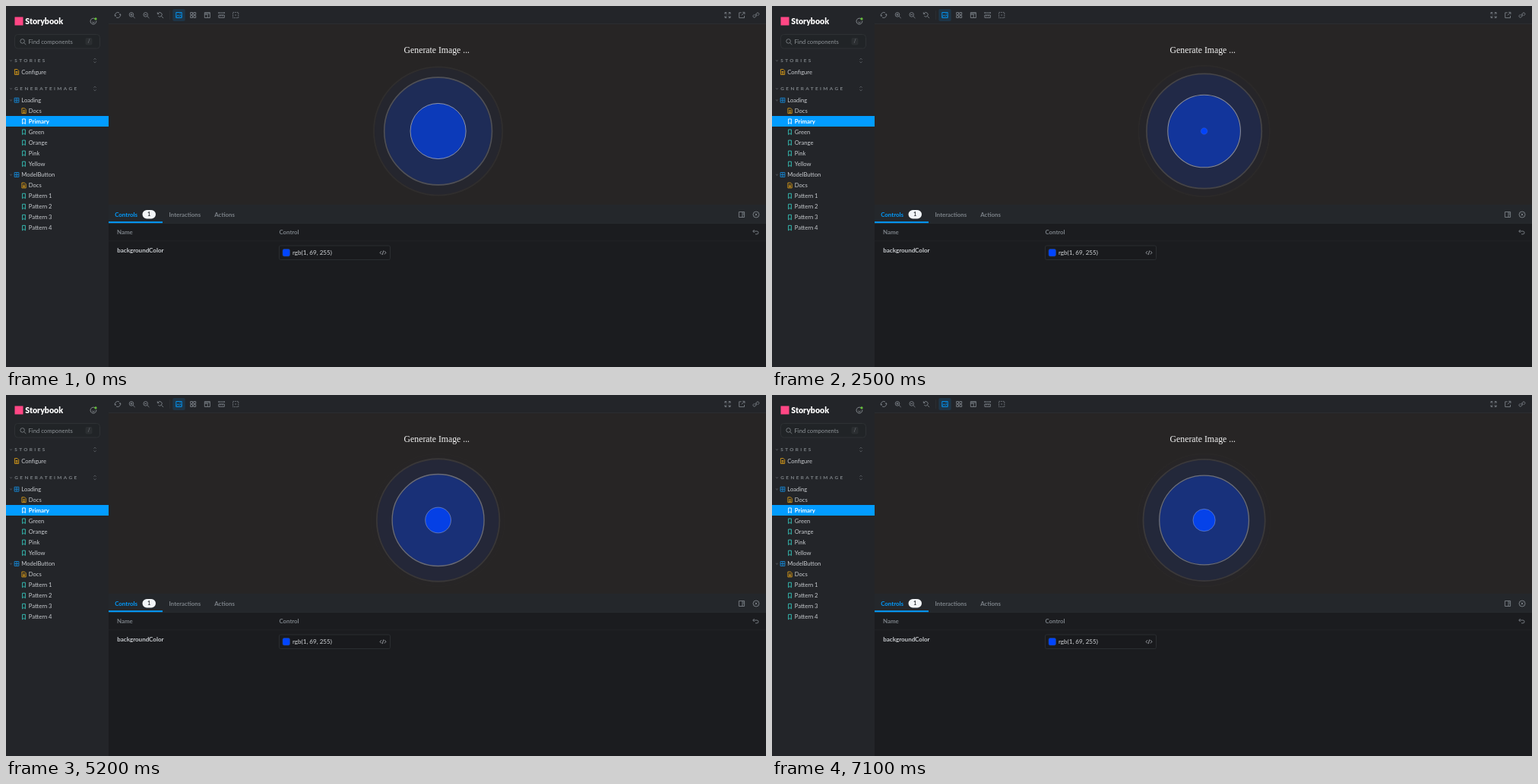
Recreate the animation shown at these times as an HTML page with a canvas. Size 1000 px wide and 476 px high, loop 7200 ms.

```html
<!DOCTYPE html>
<html lang="en">
<head>
<meta charset="utf-8">
<title>Generate Image loading</title>
<style>
  html, body { margin: 0; width: 100%; height: 100%; overflow: hidden; background: #1b1c1f; }
  canvas { display: block; width: 100vw; height: 100vh; }
</style>
</head>
<body>
<canvas id="stage" width="1000" height="476"></canvas>
<script>
const stage = document.getElementById('stage');
const c = stage.getContext('2d');
const SANS = 'Lato, "Open Sans", sans-serif';
const SERIF = '"Liberation Serif", "Times New Roman", serif';
const BLUE = '#029cff', GREY = '#7c8288', LIGHT = '#c9ccd0', BAR = '#232529', PANEL = '#1b1c1f';
const LEFT = 135, WIDTH = 865;
const LOOP = 7200, STEP = 100, PERIOD = 8000, LEAD = 25, RINGS = 4, RADIUS = 89;
const CENTER = { x: 568.6, y: 165 };

function rect(x, y, w, h, fill) {
  c.fillStyle = fill;
  c.fillRect(x, y, w, h);
}

function box(x, y, w, h, r, fill, stroke, width = 1) {
  c.beginPath();
  c.roundRect(x, y, w, h, r);
  if (fill) { c.fillStyle = fill; c.fill(); }
  if (stroke) { c.strokeStyle = stroke; c.lineWidth = width; c.stroke(); }
}

function text(str, x, y, size, color, weight = 400, spacing = 0, family = SANS) {
  c.font = `${weight} ${size}px ${family}`;
  c.letterSpacing = spacing + 'px';
  c.fillStyle = color;
  c.fillText(str, x, y);
}

// Strokes an SVG path whose coordinates are relative to (x, y).
function icon(x, y, d, color = GREY, width = 0.9) {
  c.save();
  c.translate(x, y);
  c.strokeStyle = color;
  c.lineWidth = width;
  c.stroke(new Path2D(d));
  c.restore();
}

const LENS = 'M2.1-.6A2.8 2.8 0 1 1-3.5-.6A2.8 2.8 0 1 1 2.1-.6M1.4 1.5L4 4';
const ICONS = {
  search: LENS,
  sync: 'M-3.3 1.4A3.6 3.6 0 0 1 2-3M3.3-1.4A3.6 3.6 0 0 1-2 3M-4.1-.2L-3.3 1.4L-1.9.5M4.1.2L3.3-1.4L1.9-.5',
  zoomIn: LENS + 'M-2.2-.6H.8M-.7-2.1V.9',
  zoomOut: LENS + 'M-2.2-.6H.8',
  zoomReset: 'M-3.2-2A2.8 2.8 0 1 1-2.8 1.2M-3.8-3.7V-1.5H-1.6M1.4 1.5L4 4',
  photo: 'M-3.7-3.5H3.7V3.5H-3.7ZM-3.5 2.3L-1.2 0L.6 1.6L2 .2L3.6 1.8M1-1.7H2.2',
  grid: 'M-3.5-3.5H-.7V-.7H-3.5ZM.7-3.5H3.5V-.7H.7ZM-3.5.7H-.7V3.5H-3.5ZM.7.7H3.5V3.5H.7Z',
  screens: 'M-3.6-3.4H3.5V3.5H.3M-3.6-3.4V-1M-3.6-1H.3V3.5H-3.6ZM-3-2H3.2',
  measure: 'M-3.7-3H3.7M-3.7-4V-2M3.7-4V-2M-3.7 0H3.7V3.4H-3.7ZM-1.5 0V1.6M1.2 0V1.6',
  expand: 'M-3.5-1.2V-3.5H-1.2M1.2-3.5H3.5V-1.2M3.5 1.2V3.5H1.2M-1.2 3.5H-3.5V1.2M-3.3-3.3L-1-1M3.3-3.3L1-1M3.3 3.3L1 1M-3.3 3.3L-1 1',
  external: 'M-.6-3.2H-3.5V3.6H3.3V.8M1-3.7H3.7V-1M3.5-3.5L-.3.3',
  link: 'M-.7 1.2A1.7 1.7 0 0 1-.5-1L1.1-2.7A1.7 1.7 0 0 1 3.5-.3L2.4.8M.7-1.2A1.7 1.7 0 0 1 .5 1L-1.1 2.7A1.7 1.7 0 0 1-3.5.3L-2.4-.8',
  side: 'M-3.6-3.5H3.6V3.5H-3.6ZM1-3.5V3.5M1.9-1.8H2.9M1.9 0H2.9',
  close: 'M4 0A4 4 0 1 1-4 0A4 4 0 1 1 4 0M-1.5-1.5L1.5 1.5M1.5-1.5L-1.5 1.5',
  undo: 'M-1.8-3L-3.8-1L-1.8 1M-3.6-1H1.6A1.9 1.9 0 0 1 1.6 2.8H-.5',
  code: 'M-2-2.1L-3.9 0L-2 2.1M2-2.1L3.9 0L2 2.1M.8-2.8L-.8 2.8',
  sort: 'M-1.6-1.3L0-2.9L1.6-1.3M-1.6 1.3L0 2.9L1.6 1.3',
  caret: 'M-1.2-.5L0 .6L1.2-.5',
  doc: 'M-2.6-3.4H1L2.7-1.7V3.4H-2.6ZM-1.3-.5H1.4M-1.3.8H1.4M-1.3 2.1H1.4',
  story: 'M-1.9-3.3H1.9V3.2L0 1.6L-1.9 3.2Z',
  component: 'M-2.9-2.9H2.9V2.9H-2.9ZM0-2.9V2.9M-2.9 0H2.9',
  face: 'M2.3-3A3.9 3.9 0 1 0 3.8-.4M-1.5-.9V-.8M1.2-.9V-.8M-1.7 1A2 2 0 0 0 1.7 1'
};

function heading(label, y) {
  icon(6.5, y, ICONS.caret, GREY, 0.7);
  text(label, 11.3, y + 2.3, 6.4, '#7f8489', 700, 2.4);
  icon(117, y, ICONS.sort, '#64696e', 0.8);
}

function treeRow(kind, label, y) {
  const top = kind === 'component' || label === 'Configure';
  const chosen = label === 'Primary';
  const tint = { doc: '#d69a19', story: '#37c7bd', component: '#1689d8' }[kind];
  const x = top ? 14 : 23.5;
  if (chosen) rect(0, Math.round(y - 7), LEFT, 14, BLUE);
  if (kind === 'component') icon(6.5, y, ICONS.caret, GREY, 0.7);
  icon(x, y, ICONS[kind], chosen ? '#fff' : tint);
  text(label, top ? 20.3 : 29.8, y + 2.7, chosen ? 7.8 : 7.6, chosen ? '#fff' : LIGHT, chosen ? 700 : 400);
}

function drawSidebar() {
  rect(0, 0, LEFT, 476, BAR);
  rect(11.5, 14.5, 11, 11, '#ff4785');
  text('Storybook', 25.3, 24, 10.6, '#fff', 900);
  icon(115, 20, ICONS.face, '#8d9398');
  c.fillStyle = '#66bf3c';
  c.beginPath();
  c.arc(118, 16.9, 1.6, 0, 7);
  c.fill();

  box(11.5, 37.5, 112, 18.5, 4, '#212427', '#2e3134');
  icon(22.3, 47, ICONS.search, '#868b90', 0.8);
  text('Find components', 29.5, 49.7, 7.7, '#8e9398');
  box(104.5, 42, 9, 9.5, 2, '#2b2e31');
  text('/', 107.4, 49.4, 7, '#787d82');

  heading('STORIES', 72);
  treeRow('doc', 'Configure', 87);
  heading('GENERATEIMAGE', 109);
  const rows = ['Loading', 'Docs', 'Primary', 'Green', 'Orange', 'Pink', 'Yellow',
    'ModelButton', 'Docs', 'Pattern 1', 'Pattern 2', 'Pattern 3', 'Pattern 4'];
  rows.forEach((label, i) => {
    const kind = i % 7 === 0 ? 'component' : label === 'Docs' ? 'doc' : 'story';
    treeRow(kind, label, 124.2 + i * 14.04);
  });
}

function drawToolbar() {
  rect(LEFT, 0, WIDTH, 23.5, BAR);
  rect(LEFT, 23, WIDTH, 1, '#2b2d30');
  ['sync', 'zoomIn', 'zoomOut', 'zoomReset'].forEach((name, i) => icon(147 + i * 18.7, 12, ICONS[name]));
  rect(215, 6, 0.6, 12, '#303336');
  box(219.3, 4, 16.4, 16, 2, 'rgba(2, 156, 255, .14)');
  icon(227.5, 12, ICONS.photo, BLUE);
  ['grid', 'screens', 'measure'].forEach((name, i) => icon(246.2 + i * 18.7, 12, ICONS[name]));
  c.setLineDash([1.6, 1]);
  icon(302.2, 12, 'M-3.6-3.6H3.6V3.6H-3.6Z');
  c.setLineDash([]);
  icon(302.2, 12, 'M-.8 0H.8');
  ['expand', 'external', 'link'].forEach((name, i) => icon(949.5 + i * 18.7, 12, ICONS[name]));
}

function drawPanel() {
  rect(LEFT, 262, WIDTH, 214, PANEL);
  rect(LEFT, 262, WIDTH, 24.5, '#24272b');
  rect(LEFT, 286, WIDTH, 0.7, '#2c2f32');
  rect(LEFT, 284.2, 71, 2, BLUE);
  text('Controls', 143.2, 277.7, 7.9, BLUE, 700);
  box(179.5, 269, 17.5, 11.5, 5.75, '#f2f5f8');
  text('1', 186, 277.4, 7.4, '#30343a', 700);
  text('Interactions', 214.6, 277.7, 7.8, GREY, 700);
  text('Actions', 274.2, 277.7, 7.9, GREY, 700);
  icon(968, 275, ICONS.side);
  icon(987, 275, ICONS.close);

  text('Name', 146, 301, 7.9, GREY, 700);
  text('Control', 359.5, 301, 7.8, GREY, 700);
  icon(986.5, 298, ICONS.undo);
  rect(LEFT, 309.5, WIDTH, 0.7, '#24262a');
  text('backgroundColor', 146.2, 324.8, 8, LIGHT, 700);
  box(359.5, 316, 146, 18.5, 2, '#191a1d', '#2a2d31');
  box(364, 320.5, 9.5, 9.5, 2, '#0145ff', '#27437f', 0.6);
  text('rgb(1, 69, 255)', 377, 328.2, 8.1, '#d4d7da');
  icon(496, 325.3, ICONS.code, '#a3a8ad');
}

// The CSS "ease" curve, cubic-bezier(.25, .1, .25, 1).
function ease(x) {
  let lo = 0, hi = 1;
  for (let i = 0; i < 24; i++) {
    const s = (lo + hi) / 2;
    if (0.75 * s * (1 - s) + s ** 3 < x) lo = s; else hi = s;
  }
  const s = lo, q = 1 - s;
  return 0.3 * q * q * s + 3 * q * s * s + s ** 3;
}

function circle(r) {
  c.beginPath();
  c.arc(CENTER.x, CENTER.y, r, 0, Math.PI * 2);
}

// Border and fill grow together and do not overlap.
function drawRing(phase) {
  const p = ease(phase), line = 2 * p, r = RADIUS * p;
  c.globalAlpha = 1 - p;
  circle(r - line);
  c.fillStyle = '#0145ff';
  c.fill();
  circle(r - line / 2);
  c.strokeStyle = '#fff';
  c.lineWidth = line;
  c.stroke();
  c.globalAlpha = 1;
}

function drawPreview(time) {
  rect(LEFT, 24, WIDTH, 238, '#272525');
  text('Generate Image ...', 523.6, 61.5, 11.75, '#f4f4f4', 400, 0, SERIF);
  const phase = ((time + LEAD) % (PERIOD / RINGS)) / PERIOD;
  for (let k = RINGS - 1; k >= 0; k--) drawRing(phase + k / RINGS);
}

const start = performance.now();

function draw(now) {
  const elapsed = Math.max(0, now - start) % LOOP;
  drawPreview(Math.floor(elapsed / STEP) * STEP);
  drawToolbar();
  drawSidebar();
  drawPanel();
  requestAnimationFrame(draw);
}
draw(start);
</script>
</body>
</html>
```
